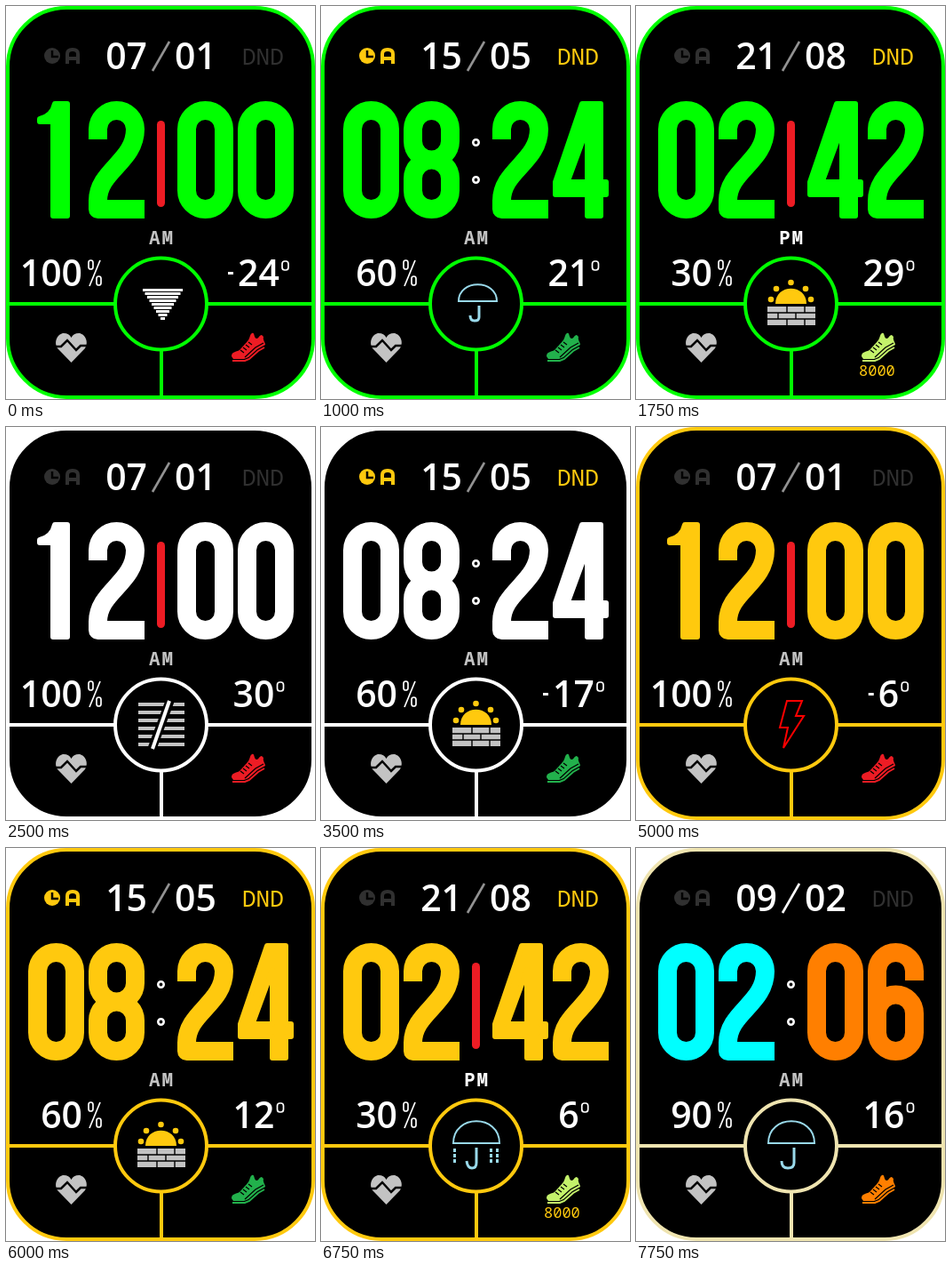
Write an HTML page that moves like this. It is 348 px wide and 442 px high and loops after 8 s.

```html
<!DOCTYPE html>
<html lang="en">
<head>
<meta charset="utf-8">
<title>Watch face</title>
<style>
  html, body { margin: 0; width: 100%; height: 100%; overflow: hidden; background: #fff; }
  svg { display: block; width: 348px; height: 442px; }
  .num { font: 600 41px "Open Sans", sans-serif; fill: #fff; }
  .pix { font-family: "Noto Sans Mono", monospace; }
  .line { fill: none; stroke-width: 4; }
  .thin { fill: none; stroke: #fff; stroke-width: 1.7; }
  .big { stroke-linejoin: round; }
  .water { fill: none; stroke: #99d9ea; stroke-width: 2; }
</style>
</head>
<body>
<svg viewBox="0 0 348 442">
  <g id="frame">
    <rect x="2" y="2" width="344" height="438" rx="66" fill="#000" stroke-width="4"/>
    <path class="line" d="M3 335H122M227 335H345M175 387V440"/>
    <circle class="line" cx="174.5" cy="335" r="51.5"/>
  </g>

  <g id="alarm">
    <circle cx="52" cy="56" r="9" stroke="none"/>
    <path d="M52 50V57H59" fill="none" stroke="#000" stroke-width="2.5"/>
    <path d="M69 65V54Q69 49 75 49T81 54V65M69 59H81" fill="none" stroke-width="4"/>
  </g>
  <text id="dnd" class="pix" x="266" y="66" font-size="26">DND</text>

  <text id="day" class="num" x="159" y="70.5" text-anchor="end"></text>
  <path id="slash" d="M184 40L165 73" stroke-width="2.6"/>
  <text id="month" class="num" x="190" y="70.5"></text>

  <g id="time"></g>
  <rect id="bar" x="170" y="129" width="9" height="97" rx="4.5" fill="#ed1c24"/>
  <g id="colon" fill="none" stroke="#fff" stroke-width="2.6">
    <circle cx="174.5" cy="153.5" r="3.2"/>
    <circle cx="174.5" cy="195.5" r="3.2"/>
  </g>
  <text id="half" class="pix" x="161" y="268" font-size="21" font-weight="600" letter-spacing="2"></text>

  <text id="battery" class="num" x="86" y="314.5" text-anchor="end"></text>
  <g class="thin">
    <path d="M106 286L94 315"/>
    <rect x="93" y="286" width="5" height="10" rx="2.5"/>
    <rect x="102" y="304" width="5" height="10" rx="2.5"/>
  </g>

  <path id="minus" d="M0 300.5h6" stroke="#fff" stroke-width="3"/>
  <text id="temp" class="num" y="314.5"></text>
  <rect id="degree" class="thin" y="287" width="7" height="10" rx="3"/>

  <g id="weather"></g>

  <path fill="#c3c3c3" d="M73.5 401L58 385C53 377 59 368 65 368Q71 368 73.5 373Q76 368 82 368C88 368 94 377 89 385Z"/>
  <path fill="none" stroke="#000" stroke-width="2.5" d="M55 383H62L69 376L79 387L84 382H92"/>

  <g id="shoe">
    <path d="M254 394C254 389 259 389 263 387L272 377C275 374 274 370 277 368C280 366 279 373 282 374C285 374 285 370 288 370L290 372C289 376 292 378 292 381L283 386L273 395L268 397H256Z"/>
    <path d="M255 399H269L274 397L284 388L291 384" fill="none" stroke-width="2"/>
    <path d="M264 387l4 3M267 384l4 3M270 381l4 3M273 378l4 3M269 395L281 384L290 379" fill="none" stroke="#000" stroke-width="1.2"/>
  </g>
  <text id="goal" class="pix" x="251" y="416" font-size="17" fill="#ffc90e">8000</text>
</svg>
<script>
const STEP = 250, COUNT = 32;
const $ = id => document.getElementById(id);
const set = (el, attrs) => { for (const a in attrs) el.setAttribute(a, attrs[a]); };
const show = (id, on) => { $(id).style.display = on ? '' : 'none'; };
const two = n => String(n).padStart(2, '0');

// Large digits on a 63 x 132 cell: centre lines, or outlines for 1 and 4
const CAP = 'a21 21 0 0 1 42 0', CUP = 'a21 21 0 0 1 -42 0';
const DIGITS = {
  0: `M10.5 31.5${CAP}V100.5${CUP}Z`,
  1: 'M33 3H44V129H28V23H13V20Q27 17 30 3Z',
  2: `M10.5 43V31.5${CAP}C52.5 68 10.5 78 10.5 112V121.5H63`,
  3: `M10.5 43V31.5${CAP}V46Q52.5 64 36 64H25H36Q52.5 64 52.5 83V100.5${CUP}V89`,
  4: 'M33 3H54V91H60V105H54V129H39V105H3V91ZM39 30V91H16.5Z',
  5: `M58 10.5H10.5V72Q12 51 31.5 51T52.5 72V100.5${CUP}V89`,
  6: 'M52.5 42V31.5a21 21 0 0 0 -42 0V100.5a21 21 0 0 0 42 0V79a21 21 0 0 0 -42 0',
  8: `M10.5 31.5${CAP}V45${CUP}ZM10.5 87${CAP}V100.5${CUP}Z`
};
const SLOTS = [25, 93, 193, 261];
const bigDigit = (d, i, color) => {
  const solid = d === '1' || d === '4';
  return `<path class="big" d="${DIGITS[d]}" transform="translate(${SLOTS[i]} 107)" fill-rule="evenodd"
    fill="${solid ? color : 'none'}" stroke="${color}" stroke-width="${solid ? 6 : 21}"/>`;
};

const range = (n, f) => Array.from({ length: n }, (_, i) => f(i)).join('');
const water = d => `<path class="water" d="${d}"/>`;
const handle = d => `<path class="water" style="stroke-width:3" d="${d}"/>`;
const dome = water('M149 332C149 299 201 299 201 332Z');
const ICONS = {
  tornado: `<path stroke="#fff" stroke-width="2.8" d="${range(9, i => `M${154 + i * 2.5} ${319.5 + i * 4}H${199 - i * 2.5}`)}"/>`,
  drizzle: water('M155 332C155 307 198 307 198 332Z') + handle('M178 337V350Q178 354 173 354T168 348'),
  umbrella: dome + handle('M178 337V354Q178 360 171 360T164 352'),
  rain: dome + handle('M175 337V354Q175 360 170 360T164 352') +
    '<path class="water" style="stroke-width:3" stroke-dasharray="4 2" d="M150.5 338V356M191.5 338V356M198.5 338V356"/>',
  fog: `<path stroke="#c3c3c3" stroke-width="4" d="${range(6, i => `M149 ${312 + i * 9}H201`)}"/>
    <path stroke="#000" stroke-width="10" d="M185 307L164 363"/>
    <path stroke="#fff" stroke-width="4" d="M184 308L165 362"/>`,
  sunset: `<path fill="#ffc90e" d="M157 335C157 312 192 312 192 335Z"/>
    <g fill="#ffc90e">${[[152, 330], [158, 318], [174.5, 311], [191, 318], [197, 330]]
      .map(([x, y]) => `<circle cx="${x}" cy="${y}" r="3.3"/>`).join('')}</g>
    <rect x="148" y="338" width="54" height="21" fill="#c3c3c3"/>
    <path stroke="#000" stroke-width="1.4" d="M148 345H202M148 352H202M170 338v7M190 338v7M160 345v7M180 345v7M170 352v7M190 352v7"/>`,
  storm: '<path fill="none" stroke="#ff0000" stroke-width="2" d="M170 308H187L180 325H189L166 361L171 338H162Z"/>'
};
const KINDS = { t: 'tornado', d: 'drizzle', u: 'umbrella', r: 'rain', f: 'fog', s: 'sunset', l: 'storm' };
const SKY = 'tfsrdulsrtfdlustsuflltrdsfurdlfu';
const TEMPS = [-24, 8, 27, -11, 21, -3, 14, 29, -19, 5, 30, -8, 18, 24, -17, 11,
  -22, 3, 26, -14, -6, 19, -2, 28, 12, -20, 23, 6, -9, 15, -13, 16];

// Frame, hours, minutes
const THEMES = [
  ['#00ff00', '#00ff00', '#00ff00'],
  ['#ffffff', '#ffffff', '#ffffff'],
  ['#ffc90e', '#ffc90e', '#ffc90e'],
  ['#efe4b0', '#00ffff', '#ff7f00']
];
const RED = '#ed1c24', ORANGE = '#ff7f00', YELLOW = '#ffc90e', GREEN = '#22b14c', LIME = '#c4f26b';
const SHOES = [RED, ORANGE, YELLOW, YELLOW, GREEN, GREEN, GREEN, LIME, LIME, LIME];
// One flag per state
const LINKED = '0110110010', ALARM = '0010110010', QUIET = '0001101101', LOCKED = '0101000010';

function drawTemp(value) {
  const text = String(Math.abs(value)), sign = value < 0 ? 11 : 0, digits = text.length * 23.5;
  const x = 284 - (sign + digits + 10) / 2;
  show('minus', sign);
  set($('minus'), { transform: `translate(${x} 0)` });
  set($('temp'), { x: x + sign });
  $('temp').textContent = text;
  set($('degree'), { x: x + sign + digits + 3 });
}

function draw(k) {
  const s = k % 10;
  // Old and new themes alternate in the second half of each run
  const blink = s > 5 && s % 2 === 0 ? 1 : 0;
  const [edge, hourColor, minuteColor] = THEMES[Math.floor(k / 10) + blink];
  const on = flags => flags[s] === '1';

  set($('frame'), { stroke: edge });
  const clock = two(2 * s % 12 || 12) + two(6 * s);
  $('time').innerHTML = [...clock].map((d, i) => bigDigit(d, i, i < 2 ? hourColor : minuteColor)).join('');
  show('bar', !on(LINKED));
  show('colon', on(LINKED));

  $('day').textContent = two(7 + 2 * s);
  $('month').textContent = two(s + 1);
  set($('slash'), { stroke: on(LOCKED) ? '#fff' : '#929292' });

  const bell = on(ALARM) ? YELLOW : '#303030';
  set($('alarm'), { fill: bell, stroke: bell });
  set($('dnd'), { fill: on(QUIET) ? YELLOW : '#303030' });
  $('half').textContent = s < 6 ? 'AM' : 'PM';
  set($('half'), { fill: s < 6 ? '#c3c3c3' : '#fff' });

  $('battery').textContent = 100 - 10 * s;
  drawTemp(TEMPS[k]);
  $('weather').innerHTML = ICONS[KINDS[SKY[k]]];
  set($('shoe'), { fill: SHOES[s], stroke: SHOES[s], 'stroke-width': 0 });
  show('goal', s > 6);
}

let last = -1;
function tick() {
  const k = Math.floor(performance.now() / STEP) % COUNT;
  if (k !== last) draw(last = k);
  requestAnimationFrame(tick);
}
tick();
</script>
</body>
</html>
```
